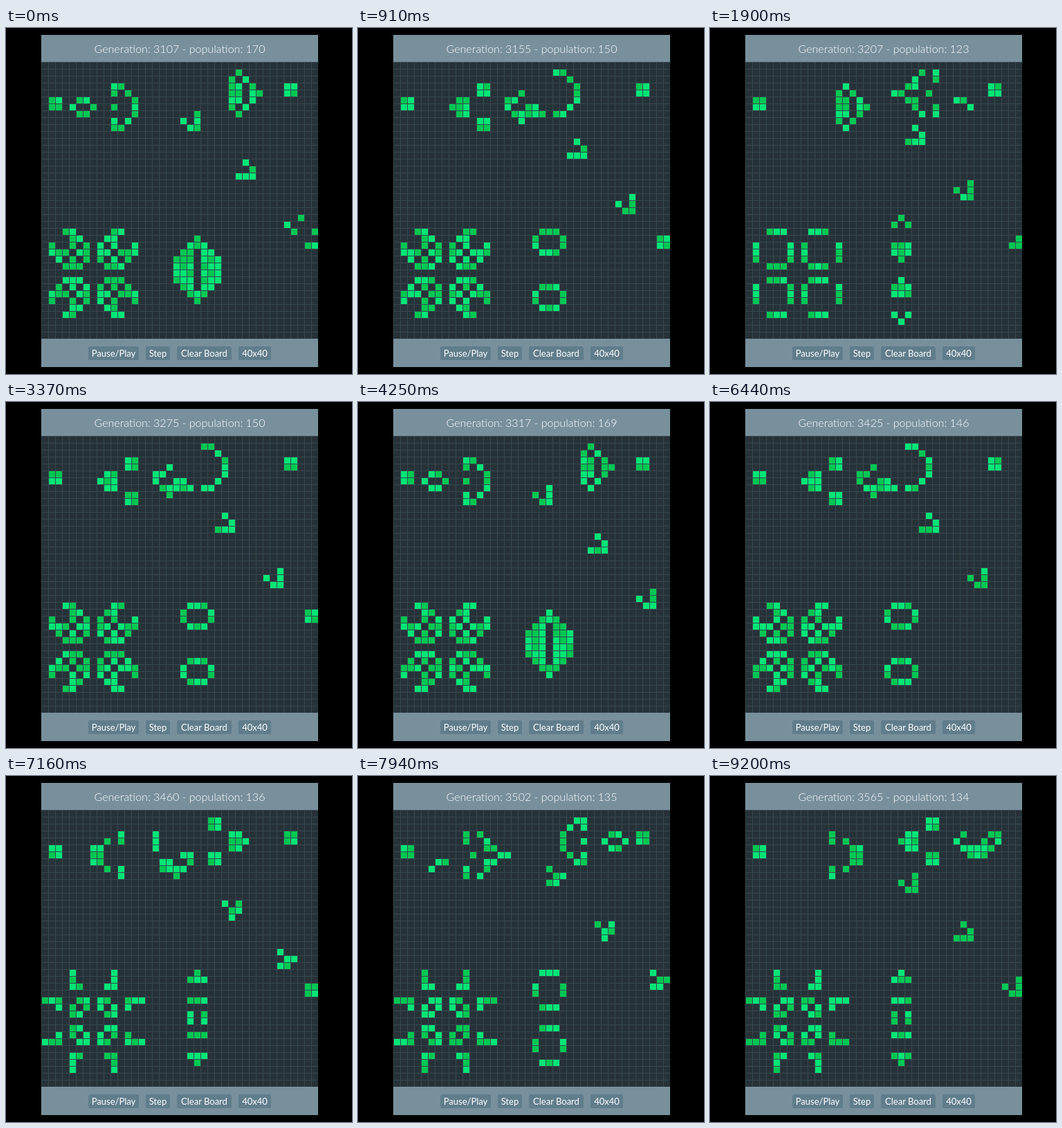
Animation, 500 px wide and 500 px high, one loop 9300 ms. Source, as an HTML page:

```html
<!DOCTYPE html>
<html lang="en">
<head>
<meta charset="utf-8">
<title>Game of Life</title>
<style>
  html, body { margin: 0; width: 100%; height: 100%; overflow: hidden; background: #000; }
  svg { display: block; width: 100%; height: 100%; }
  text { fill: #fff; text-anchor: middle; font-family: Lato, sans-serif; }
  #status { font-size: 16px; font-weight: 300; }
  #buttons text { font-size: 13px; }
  #buttons rect { fill: #607d8b; }
  .crisp { shape-rendering: crispEdges; }
</style>
</head>
<body>
<svg viewBox="0 0 500 500">
  <rect width="500" height="500" fill="#000"/>
  <g class="crisp">
    <rect x="51" y="10" width="400" height="480" fill="#78909c"/>
    <rect x="51" y="49" width="400" height="400" fill="#263238"/>
    <path id="grid" fill="none" stroke="#37474f"/>
    <path id="light" fill="#00e676"/>
    <path id="dark" fill="#00c853"/>
  </g>
  <text id="status" x="251" y="36"></text>
  <g id="buttons"></g>
</svg>
<script>
const SIZE = 40, CELL = 10, LEFT = 51, TOP = 49;
const LOOP = 9300, CYCLE = 60;
const el = id => document.getElementById(id);

// Runs of evenly spaced redraws: first time, last time, count
const RUNS = [
  [0, 0, 1], [30, 960, 20], [1040, 1900, 18], [1950, 1950, 1], [2000, 2930, 21],
  [2970, 3370, 9], [3400, 3880, 11], [3930, 4830, 22], [4870, 5150, 7],
  [5190, 5740, 12], [5810, 6440, 15], [6530, 6730, 5], [6770, 7670, 19],
  [7710, 7940, 6], [7990, 8630, 13], [8680, 9200, 12]
];
// Time and generation reached
const PACE = [[0, 3107], [1900, 3207], [3370, 3275], [5150, 3362], [6440, 3425], [7940, 3502], [9200, 3565]];

const GUN = [
  '........................O...........',
  '......................O.O...........',
  '............OO......OO............OO',
  '...........O...O....OO............OO',
  'OO........O.....O...OO..............',
  'OO........O...O.OO....O.O...........',
  '..........O.....O.......O...........',
  '...........O...O....................',
  '............OO......................'
];

function seedBoard() {
  const board = new Uint8Array(SIZE * SIZE);
  const set = (c, r) => { board[r * SIZE + c] = 1; };
  GUN.forEach((row, r) => [...row].forEach((ch, c) => ch === 'O' && set(c + 1, r + 1)));
  // Pulsar around (7, 30)
  for (const bar of [-6, -1, 1, 6])
    for (const k of [-4, -3, -2, 2, 3, 4]) {
      set(7 + k, 30 + bar);
      set(7 + bar, 30 + k);
    }
  // Pentadecathlon
  for (let r = 26; r < 34; r++)
    for (let c = 21; c < 24; c++) set(c, r);
  return board;
}

// One generation; everything beyond the edge is dead
function step(board) {
  const next = new Uint8Array(board.length);
  for (let r = 0; r < SIZE; r++)
    for (let c = 0; c < SIZE; c++) {
      let sum = 0;
      for (let y = Math.max(r - 1, 0); y <= Math.min(r + 1, SIZE - 1); y++)
        for (let x = Math.max(c - 1, 0); x <= Math.min(c + 1, SIZE - 1); x++)
          sum += board[y * SIZE + x];
      const i = r * SIZE + c;
      next[i] = sum === 3 || (sum === 4 && board[i]) ? 1 : 0;
    }
  return next;
}

// After warming up, the whole board repeats every CYCLE generations
function buildCycle() {
  let board = seedBoard();
  for (let i = 0; i < CYCLE * 5; i++) board = step(board);
  return Array.from({ length: CYCLE }, () => {
    const now = board;
    board = step(board);
    return now;
  });
}

function coin(i, gen) {
  let h = Math.imul(i + 1, 0x9e3779b1) ^ Math.imul(gen, 0x85ebca6b);
  h = Math.imul(h ^ (h >>> 15), 0x2c1b3c6d);
  h = Math.imul(h ^ (h >>> 12), 0x297a2d39);
  return (h ^ (h >>> 15)) & 1;
}

function generationAt(t) {
  let k = 0;
  while (k < PACE.length - 2 && t >= PACE[k + 1][0]) k++;
  const [t0, g0] = PACE[k], [t1, g1] = PACE[k + 1];
  return Math.round(g0 + (g1 - g0) * (t - t0) / (t1 - t0));
}

const boards = buildCycle();
const times = RUNS.flatMap(([a, b, n]) =>
  Array.from({ length: n }, (_, i) => n > 1 ? Math.round((a + (b - a) * i / (n - 1)) / 10) * 10 : a));

let lines = '';
for (let i = 0; i < SIZE; i++)
  lines += `M${LEFT + i * CELL + .5} ${TOP}v400M${LEFT} ${TOP + i * CELL + .5}h400`;
el('grid').setAttribute('d', lines);

el('buttons').innerHTML = [
  ['Pause/Play', 119, 73], ['Step', 202, 35], ['Clear Board', 247, 79], ['40x40', 336, 47]
].map(([label, x, w]) =>
  `<rect x="${x}" y="460" width="${w}" height="20" rx="2"/><text x="${x + w / 2}" y="475">${label}</text>`
).join('');

let shown = -1;
function draw(t) {
  let k = times.length - 1;
  while (times[k] > t) k--;
  const gen = generationAt(times[k]);
  if (gen === shown) return;
  shown = gen;
  const paths = ['', ''];
  let population = 0;
  boards[gen % CYCLE].forEach((alive, i) => {
    if (!alive) return;
    population++;
    const x = LEFT + 1 + i % SIZE * CELL, y = TOP + 1 + Math.floor(i / SIZE) * CELL;
    paths[coin(i, gen)] += `M${x} ${y}h9v9h-9z`;
  });
  el('light').setAttribute('d', paths[0]);
  el('dark').setAttribute('d', paths[1]);
  el('status').textContent = `Generation: ${gen} - population: ${population}`;
}

const start = performance.now();
function tick() {
  draw((performance.now() - start) % LOOP);
  requestAnimationFrame(tick);
}
tick();
</script>
</body>
</html>
```
